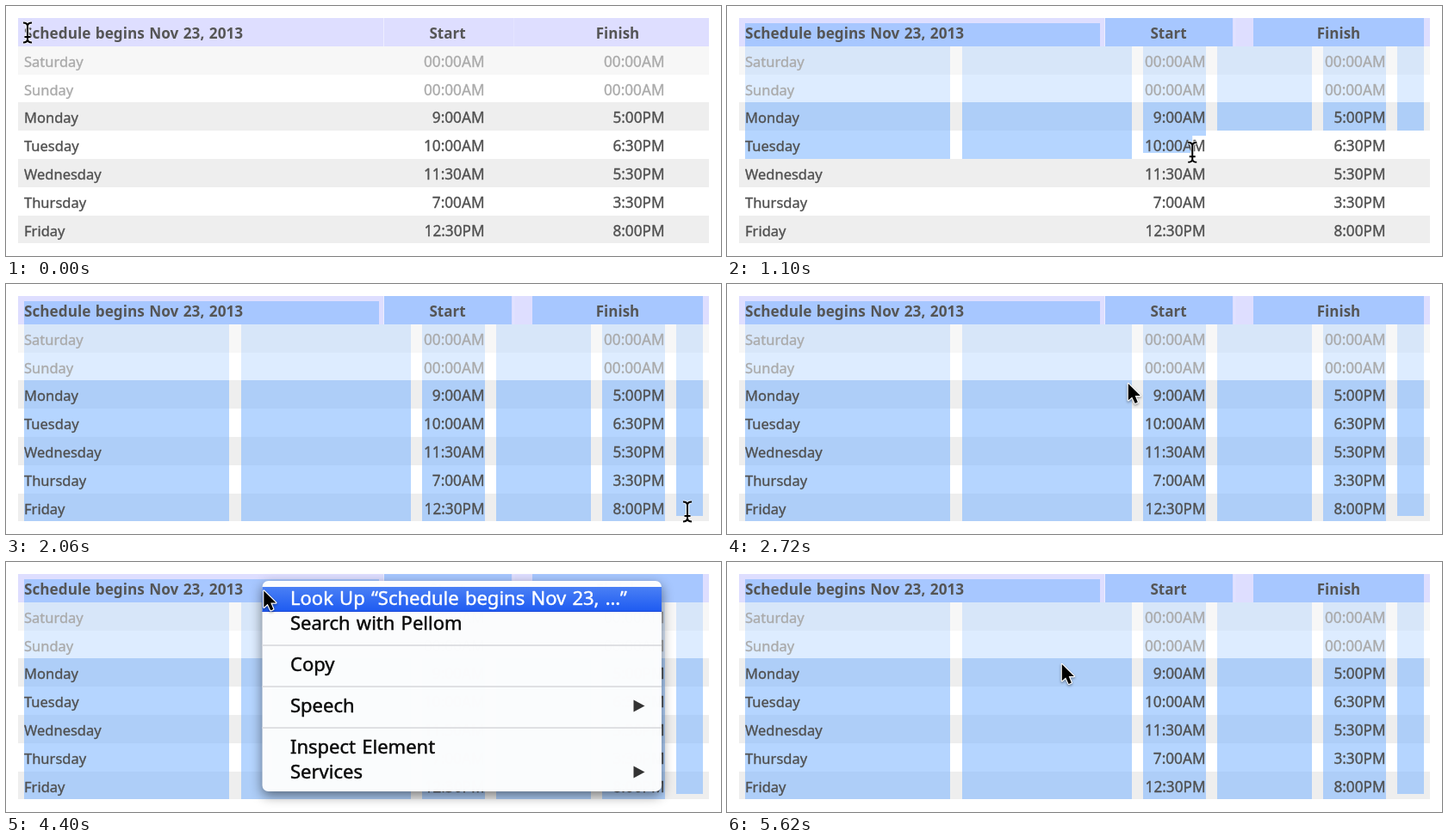
These frames come from a looping animation (830x291 px, 5660 ms). An HTML page with a canvas:

```html
<!DOCTYPE html>
<html lang="en">
<head>
<meta charset="utf-8">
<title>Selecting and copying a schedule</title>
<style>
html, body { margin: 0; width: 100%; height: 100%; overflow: hidden; background: #fff; }
canvas { display: block; }
</style>
</head>
<body>
<canvas id="stage" width="830" height="291"></canvas>
<script>
const ctx = document.getElementById('stage').getContext('2d');
const LOOP = 5660;
const FONT = '"Noto Sans", "Open Sans", sans-serif';

const rows = [
  ['Schedule begins Nov 23, 2013', 'Start', 'Finish'],
  ['Saturday', '00:00AM', '00:00AM'],
  ['Sunday', '00:00AM', '00:00AM'],
  ['Monday', '9:00AM', '5:00PM'],
  ['Tuesday', '10:00AM', '6:30PM'],
  ['Wednesday', '11:30AM', '5:30PM'],
  ['Thursday', '7:00AM', '3:30PM'],
  ['Friday', '12:30PM', '8:00PM']
];
const headCells = [[21, 433], [439, 587], [611, 809]];
const bodyCells = [[21, 259], [273, 470], [483, 556], [569, 679], [692, 765], [778, 809]];
const rowTop = i => Math.round(14 + 32.8 * i);
const isOff = i => i === 1 || i === 2;

const MENU = { x: 297.5, y: 22, w: 463.5, h: 245 };
const items = [
  { label: 'Look Up “Schedule begins Nov 23, …”', base: 50, top: 29 },
  { label: 'Search with Pellom', base: 79, top: 58 },
  { label: 'Copy', base: 127, top: 106 },
  { label: 'Speech', base: 175, top: 154, sub: true },
  { label: 'Inspect Element', base: 223, top: 202 },
  { label: 'Services', base: 252, top: 231, sub: true }
];

// keys: [time, x, y]
const beamPath = [[320, 25, 31], [740, 301, 109], [1540, 743, 230], [2060, 791, 265]];
const arrowPath = [[2380, 786, 251], [2720, 465, 115], [3150, 297, 31], [4350, 297, 31], [5000, 388, 118]];
const SWAP = 2120, MENU_IN = 3300, PICK = 5280, FADE = 5400, MENU_OUT = 5620;

// Smooth monotone curve through the keys.
function along(path, t) {
  const last = path.length - 1;
  if (t <= path[0][0]) return path[0].slice(1);
  if (t >= path[last][0]) return path[last].slice(1);
  let i = 0;
  while (t >= path[i + 1][0]) i++;
  const dt = path[i + 1][0] - path[i][0], u = (t - path[i][0]) / dt;
  return [1, 2].map(k => {
    const slope = j => (path[j + 1][k] - path[j][k]) / (path[j + 1][0] - path[j][0]);
    const tangent = j => {
      if (j === 0 || j === last) return 0;
      const a = slope(j - 1), b = slope(j);
      return a * b > 0 ? 2 * a * b / (a + b) : 0;
    };
    const p = path[i][k], q = path[i + 1][k];
    return p + (q - p) * u * u * (3 - 2 * u)
      + dt * u * (1 - u) * (tangent(i) * (1 - u) - tangent(i + 1) * u);
  });
}

function box(x, y, w, h, color) {
  ctx.fillStyle = color;
  ctx.fillRect(x, y, w, h);
}

// Regular text gets a hairline stroke for a slightly heavier weight.
function text(str, x, y, size, color, align = 'left', weight = 400) {
  ctx.font = `${weight} ${size}px ${FONT}`;
  ctx.textAlign = align;
  ctx.fillStyle = ctx.strokeStyle = color;
  ctx.lineWidth = size / 50;
  ctx.lineJoin = 'round';
  ctx.fillText(str, x, y);
  if (weight === 400) ctx.strokeText(str, x, y);
}

function rowFill(i) {
  if (i === 0) return '#dedeff';
  if (i === 1) return '#f7f7f7';
  return i % 2 ? '#eeeeee' : '#ffffff';
}

function drawRows() {
  rows.forEach((r, i) => box(14, rowTop(i), 802, rowTop(i + 1) - rowTop(i), rowFill(i)));
  box(438, 14, 1, 33, 'rgba(255,255,255,.45)');
  box(589, 14, 1, 33, 'rgba(255,255,255,.2)');
}

function drawSelection(x, y, all) {
  rows.forEach((r, i) => {
    const top = rowTop(i), end = rowTop(i + 1);
    if (!all && y < top) return;
    const color = `rgba(132,185,255,${isOff(i) ? .28 : .6})`;
    const whole = all || y >= end;
    (i ? bodyCells : headCells).forEach(([a, b], c) => {
      const from = i === 0 && c === 0 ? 20 : top;
      const to = i === 7 && c === 5 ? 270 : end;
      if (whole || x > b) {
        box(a, from, b - a, to - from, color);
      } else if (x > a) {
        const limit = i && c === 0 ? a + 70 : i && c === 1 ? a + 4 : b;
        if (i) box(a, top, b - a, 6, color);
        box(a, top + 6, Math.min(x, limit) - a, 20, color);
      }
    });
  });
}

function drawText() {
  rows.forEach((r, i) => {
    const y = rowTop(i) + 24;
    if (i === 0) {
      ctx.wordSpacing = '1px';
      text(r[0], 21, y, 17.2, '#555', 'left', 700);
      text(r[1], 512.5, y, 17, '#555', 'center', 700);
      text(r[2], 710, y, 17, '#555', 'center', 700);
      return;
    }
    const color = isOff(i) ? '#aaa' : '#505050';
    text(r[0], 21, y, 16.5, color);
    text(r[1], 555.5, y, 17.2, color, 'right');
    text(r[2], 764.5, y, 17.2, color, 'right');
  });
}

function drawMenu(x, y, alpha, lit) {
  const m = MENU;
  ctx.save();
  ctx.globalAlpha = alpha;
  ctx.wordSpacing = '1.5px';
  ctx.beginPath();
  ctx.roundRect(m.x, m.y, m.w, m.h, 7);
  ctx.save();
  ctx.shadowColor = 'rgba(0,0,0,.5)';
  ctx.shadowBlur = 14;
  ctx.shadowOffsetY = 5;
  ctx.fillStyle = 'rgba(253,254,255,.985)';
  ctx.fill();
  ctx.restore();
  for (const line of [96, 144, 192]) box(m.x, line, m.w, 2, '#dfe0e3');
  for (const it of items) {
    const on = lit && x > m.x + 1 && y >= it.top && y < it.top + 29;
    if (on) {
      const g = ctx.createLinearGradient(0, it.top, 0, it.top + 29);
      g.addColorStop(0, '#4a80f5');
      g.addColorStop(1, '#1d5af1');
      box(m.x, it.top, m.w, 29, g);
      box(m.x, it.top + 28, m.w, 1, '#1a48d8');
    }
    text(it.label, 330, it.base, 22, on ? '#fff' : '#0a0a0a');
    if (it.sub) {
      ctx.fillStyle = '#333';
      ctx.beginPath();
      ctx.moveTo(728.5, it.base - 14.5);
      ctx.lineTo(741.5, it.base - 7.5);
      ctx.lineTo(728.5, it.base - .5);
      ctx.fill();
    }
  }
  ctx.restore();
}

function drawBeam(x, y) {
  ctx.save();
  ctx.translate(x, y);
  ctx.beginPath();
  for (const s of [-1, 1]) {
    ctx.moveTo(-5, 11.5 * s);
    ctx.quadraticCurveTo(-.5, 11.5 * s, 0, 8 * s);
    ctx.quadraticCurveTo(.5, 11.5 * s, 5, 11.5 * s);
  }
  ctx.moveTo(0, -9);
  ctx.lineTo(0, 9);
  ctx.moveTo(-3.5, 5);
  ctx.lineTo(3.5, 5);
  ctx.strokeStyle = 'rgba(255,255,255,.75)';
  ctx.lineWidth = 4;
  ctx.stroke();
  ctx.strokeStyle = '#000';
  ctx.lineWidth = 2;
  ctx.stroke();
  ctx.restore();
}

function drawArrow(x, y) {
  const pts = [[0, 0], [0, 22], [5, 17.5], [9, 26], [12.5, 24.5], [9, 16], [16, 16]];
  ctx.save();
  ctx.translate(x + .8, y + 1);
  ctx.scale(.88, .88);
  ctx.beginPath();
  pts.forEach(p => ctx.lineTo(...p));
  ctx.closePath();
  ctx.lineJoin = 'round';
  ctx.lineWidth = 2.6;
  ctx.strokeStyle = '#fff';
  ctx.shadowColor = 'rgba(0,0,0,.4)';
  ctx.shadowBlur = 3;
  ctx.shadowOffsetY = 1.5;
  ctx.stroke();
  ctx.shadowColor = 'transparent';
  ctx.fillStyle = '#000';
  ctx.fill();
  ctx.restore();
}

function draw(t) {
  box(0, 0, 830, 291, '#fff');
  drawRows();
  const beam = along(beamPath, t), arrow = along(arrowPath, t);
  if (t >= 320) drawSelection(...beam, t >= 2060);
  drawText();
  if (t >= MENU_IN && t < MENU_OUT) {
    const alpha = t < FADE ? 1 : 1 - (t - FADE) / (MENU_OUT - FADE);
    const lit = t < PICK || t >= PICK + 60;
    drawMenu(...arrow, alpha, lit);
  }
  if (t < SWAP) drawBeam(...beam);
  else drawArrow(...arrow);
}

const start = performance.now();
function tick() {
  const t = (performance.now() - start) % LOOP;
  draw(Math.floor(t / 20) * 20);
  requestAnimationFrame(tick);
}
tick();
</script>
</body>
</html>
```
